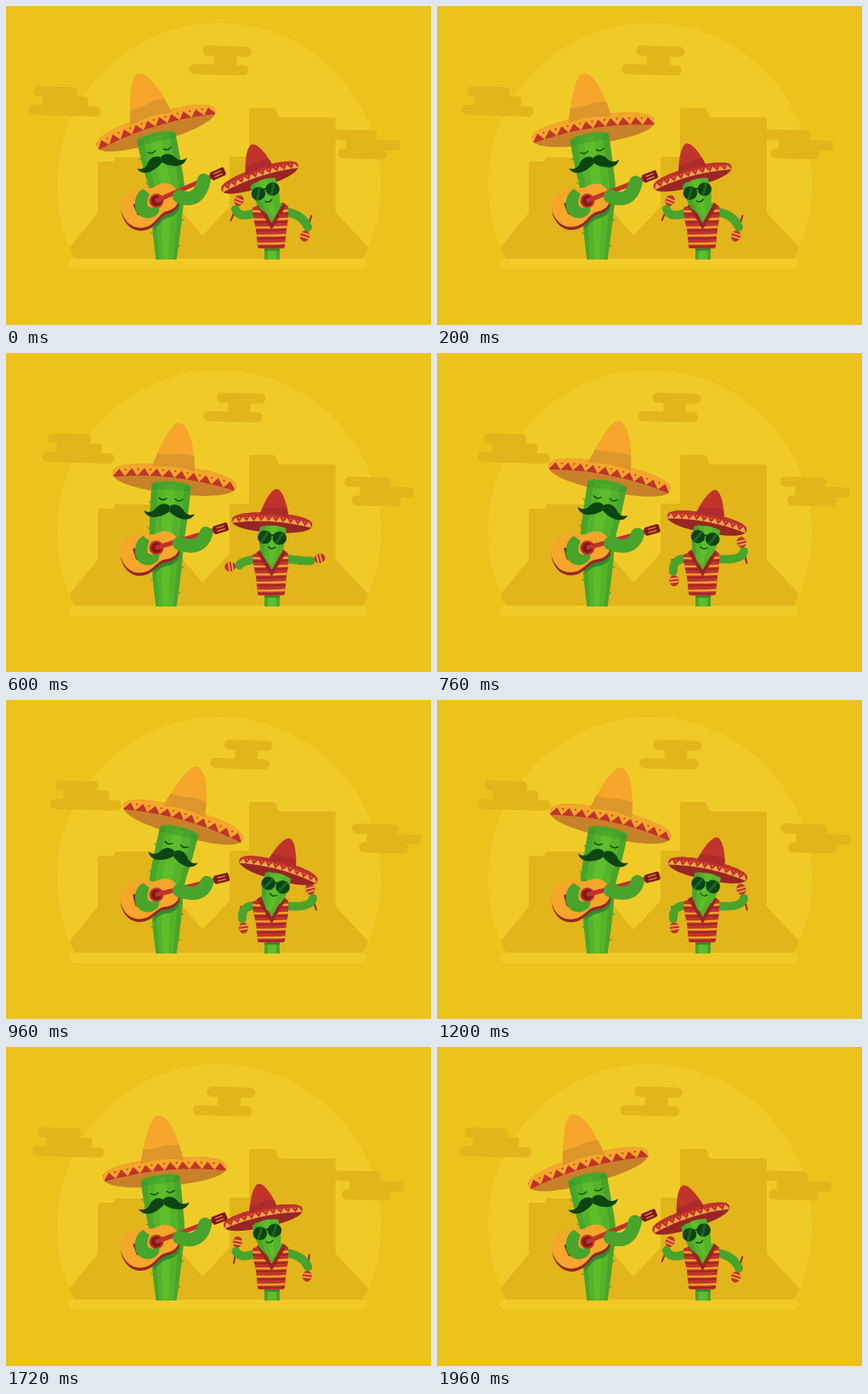
Write an HTML page with a canvas that moves like this. It is 500x375 px and loops after 2 s.

```html
<!DOCTYPE html>
<html lang="en">
<head>
<meta charset="utf-8">
<title>Cactus duo</title>
<style>
html, body { margin: 0; width: 100%; height: 100%; overflow: hidden; background: #edc31b; }
canvas { display: block; width: 500px; height: 375px; }
</style>
</head>
<body>
<canvas id="stage" width="500" height="375"></canvas>
<script>
const ctx = document.getElementById('stage').getContext('2d');
const LOOP = 2000, STEP = 40, RAD = Math.PI / 180;
const C = {
  sky: '#edc31b', sun: '#f0cb28', sand: '#e2b51a',
  green: '#54b329', light: '#5dbd2a', dark: '#48a42b', shade: '#2f8a2b', ink: '#0c4512',
  orange: '#f5a62b', amber: '#dd962a', brown: '#c78128',
  red: '#c1332b', brick: '#ad2b2a', wine: '#982524', deep: '#7d1a1c', peach: '#f2a545'
};

// ---------- helpers ----------
const mix = (a, b, k) => a + (b - a) * k;
const smooth = (a, b, v) => {
  const u = Math.min(1, Math.max(0, (v - a) / (b - a)));
  return u * u * (3 - 2 * u);
};
const wave = t => (1 - Math.cos(2 * Math.PI * t / LOOP)) / 2;

function poly(points, color) {
  ctx.beginPath();
  points.forEach(([x, y]) => ctx.lineTo(x, y));
  ctx.closePath();
  ctx.fillStyle = color;
  ctx.fill();
}
function oval(x, y, rx, ry, color) {
  ctx.beginPath();
  ctx.ellipse(x, y, rx, ry, 0, 0, Math.PI * 2);
  ctx.fillStyle = color;
  ctx.fill();
}
function box(x, y, w, h, r, color) {
  ctx.beginPath();
  ctx.roundRect(x, y, w, h, r);
  ctx.fillStyle = color;
  ctx.fill();
}
function shape(d, color) {
  ctx.fillStyle = color;
  ctx.fill(new Path2D(d));
}
function line(d, color, width) {
  ctx.strokeStyle = color;
  ctx.lineWidth = width;
  ctx.lineCap = ctx.lineJoin = 'round';
  ctx.stroke(new Path2D(d));
}
function at(x, y, deg, draw) {
  ctx.save();
  ctx.translate(x, y);
  ctx.rotate(deg * RAD);
  draw();
  ctx.restore();
}
function inside(path, draw) {
  ctx.save();
  ctx.clip(path);
  draw();
  ctx.restore();
}

// ---------- scenery ----------
function cloud(x, y, top, middle, bottom) {
  at(x, y, 1.4, () => [top, middle, bottom].forEach(([l, w], i) => box(l, i * 11, w, 12, i === 1 ? 4 : 6, C.sand)));
}
function scenery(p) {
  ctx.fillStyle = C.sky;
  ctx.fillRect(0, 0, 500, 375);
  const sun = new Path2D();
  sun.ellipse(250.5, 210, 190.5, 190, 0, 0, Math.PI * 2);
  const sky = new Path2D();
  sky.rect(0, 0, 500, 298);
  inside(sky, () => inside(sun, () => {
    ctx.fillStyle = C.sun;
    ctx.fillRect(0, 0, 500, 375);
    shape('M63 298L108 243V186Q108 183 111 183H125Q128 183 128 178H201Q204 178 204 181V238L231 270L263 236V180Q263 177 266 177H286V123Q286 120 289 120H314Q318 120 319 127Q320 131 324 131H385Q388 131 388 134V243L440 298Z', C.sand);
  }));
  box(74, 297, 351, 12, 6, C.sun);
  const s = 25 * p;
  cloud(27 + s, 94, [6, 51], [16, 54], [0, 85]);
  cloud(216 + s, 46, [16, 57], [29, 27], [0, 70]);
  cloud(382 + s, 145, [0, 55], [18, 64], [9, 58]);
}

// ---------- hats ----------
function brim(rx, ry, teeth, paint) {
  const outline = new Path2D(), base = x => rx * (-0.03 + 0.1 * (x / rx) ** 2);
  for (let i = 0; i < 72; i++) {
    const a = i * 5 * RAD, c = Math.cos(a), s = Math.sin(a);
    outline.lineTo(rx * Math.sign(c) * Math.abs(c) ** 0.88, ry * Math.sign(s) * Math.abs(s) ** 0.88);
  }
  inside(outline, () => {
    ctx.fillStyle = paint.under;
    ctx.fillRect(-rx, -ry, rx * 2, ry * 2);
    shape(`M${-rx} ${base(rx)}Q0 ${2 * base(0) - base(rx)} ${rx} ${base(rx)}V${-ry}H${-rx}Z`, paint.band);
    const w = rx * 2 / teeth, tall = rx * 0.125;
    for (let i = 0; i < teeth; i++) {
      const x = -rx + i * w, mid = x + w / 2;
      poly([[x, base(x)], [mid, base(mid) - tall], [x + w, base(x + w)]], paint.teeth);
      oval(x, base(x) - tall * 0.85, rx / 70, rx / 70, paint.teeth);
    }
  });
}
function cone(d, shadow, color, tint) {
  const path = new Path2D(d);
  ctx.fillStyle = color;
  ctx.fill(path);
  inside(path, () => shape(shadow, tint));
}
function bigHat() {
  brim(73, 16.5, 10, { under: C.brown, band: C.orange, teeth: C.red });
  cone('M-28 -12C-22 -34 -16 -52 -10 -61Q-4 -71 4 -65C13 -58 20 -36 23 -12Q0 -18 -28 -12Z',
    'M-30 -30Q-14 -27 -2 -30T30 -28V-8H-30Z', C.orange, C.amber);
}
function smallHat() {
  brim(47.5, 11.5, 11, { under: C.wine, band: C.red, teeth: C.peach });
  cone('M-15 -8C-11 -23 -6 -33 -2 -37Q3 -43 8 -37C13 -31 17 -20 19 -8Q3 -12 -15 -8Z',
    'M-20 -18Q-6 -16 2 -18T24 -17V-6H-20Z', C.red, C.brick);
}

// ---------- guitarist ----------
const TOP = 155, FOOT = 298;
function trunk(y, f) {
  const u = Math.max(0, (y - TOP) / (FOOT - TOP));
  return 190 - 1.5 * u + (2 * f - 1) * (23 - 11 * u ** 1.8);
}
const GUITAR = new Path2D('M-43 1C-44 -15 -31 -24 -17 -22C-7 -21 -3 -15 5 -16C16 -18 26 -13 27 0C27 13 17 18 6 16C-2 15 -7 21 -17 23C-31 25 -42 16 -43 1Z');
function guitarShape(x, y, tilt, color) {
  at(x, y, tilt, () => {
    ctx.fillStyle = color;
    ctx.fill(GUITAR);
  });
}
function guitarist(p, ramp) {
  const m = (ramp + Math.sin(ramp * Math.PI / 2)) / 2;
  const hump = 4 * p * (1 - p), lean = mix(-12.5, 13, p);
  const px = 190, py = 214 + 3.4 * hump;

  at(176.5 + 33 * (ramp + m) / 2, 143.5 + 6 * hump, mix(-17, 16.5, m), bigHat);

  // The trunk is straight at the foot and turns with the head above it.
  const bend = (x, y) => {
    const k = smooth(246, 190, y), a = lean * k * RAD, dx = x - px, dy = y - 217;
    return [px + dx * Math.cos(a) - dy * Math.sin(a), 217 + (py - 217) * k + dx * Math.sin(a) + dy * Math.cos(a)];
  };
  const strip = (f, g, color, end = FOOT) => {
    const left = [], right = [];
    for (let i = 0; i <= 36; i++) {
      const y = mix(TOP, end, i / 36);
      left.push(bend(trunk(y, f), y));
      right.unshift(bend(trunk(y, g), y));
    }
    poly(left.concat(right), color);
  };
  at(px, py, lean, () => oval(0, -62, 23, 4.5, C.dark));
  strip(0, 1, C.green);
  strip(0, 0.16, C.dark);
  strip(0.34, 0.62, C.light);
  strip(0.84, 1, C.dark);
  strip(0, 1, 'rgba(47,138,43,.35)', 161);

  for (let i = 0; i < 8; i++) {
    const side = i % 2, y = 178 + i * 15, d = side ? 2.2 : -2.2;
    line(`M${bend(trunk(y, side), y)}L${bend(trunk(y, side) + d, y - 1.8)}`, C.dark, 1.1);
  }

  at(px, py, lean, () => {
    for (const x of [-9, 10]) line(`M${x - 4.5} -46Q${x} -42 ${x + 4.5} -46`, C.ink, 1.3);
    const half = 'M0 -6C-4 -10 -12 -9 -16 -3C-19 2 -24 4 -30 1C-27 8 -20 9 -14 7.5C-8 6 -3 3 0 0Z';
    at(0, -31, 0, () => {
      shape(half, C.ink);
      ctx.scale(-1, 1);
      shape(half, C.ink);
    });
  });

  const tilt = mix(-23.7, -13.9, m);
  const lower = new Path2D();
  for (const y of [195, 220, 250, 280]) lower.rect(trunk(y + 25, 0), y, trunk(y + 25, 1) - trunk(y + 25, 0), 30);
  inside(lower, () => guitarShape(178, 237, tilt, C.shade));
  guitarShape(177.5, 232.5, tilt, C.wine);
  guitarShape(177, 229, tilt, C.orange);
  at(177, 229, tilt, () => {
    oval(0, 0, 8.5, 8.5, C.red);
    oval(0, 0, 6.2, 6.2, C.deep);
    box(-27, -7, 3.5, 14, 1, C.deep);
    box(-1, -2.8, 72, 5.4, 0, C.red);
    box(70, -5, 18, 10, 2, C.deep);
    for (const y of [-2.6, 1.2]) box(74, y, 10, 1.5, 0.7, '#e07a3c');
  });

  shape('M161 215C152 220 150 232 153 241C157 249 168 252 175 247Q182 243 180 236Q172 239 167 235Q165 228 169 221Z', C.dark);
  const a = tilt * RAD, hx = 177 + 62 * Math.cos(a), hy = 229 + 62 * Math.sin(a);
  line(`M204 224Q${hx - 7} 233 ${hx - 1} ${hy + 1}`, C.dark, 16);
}

// ---------- maraca player ----------
const LEFT = {
  shoulder: [296, 242],
  rest: { hand: [270, 239], elbow: [274, 251], turn: -68 },
  swung: { hand: [278, 257], elbow: [277, 240], turn: -277 }
};
const RIGHT = {
  shoulder: [329, 242],
  rest: { hand: [355, 260], elbow: [349, 245], turn: 108 },
  swung: { hand: [361, 233], elbow: [359, 245], turn: -106 }
};
function maraca() {
  line('M-14 0H6', C.wine, 2);
  const head = new Path2D();
  head.ellipse(11, 0, 6.5, 5.6, 0, 0, Math.PI * 2);
  inside(head, () => {
    box(0, -8, 20, 16, 0, C.red);
    for (const x of [7.5, 11.5]) box(x, -8, 1.8, 16, 0, C.peach);
  });
}
function arm({ shoulder, rest, swung }, k) {
  const hand = rest.hand.map((v, i) => mix(v, swung.hand[i], k));
  const elbow = rest.elbow.map((v, i) => mix(v, swung.elbow[i], k));
  at(...hand, mix(rest.turn, swung.turn, k), maraca);
  line(`M${shoulder}Q${elbow} ${hand}`, C.dark, 10);
}
function player(p, swing) {
  box(304, 280, 18, 18, 0, C.dark);
  box(308, 280, 10, 18, 0, C.light);
  box(304, 285, 18, 2.5, 0, C.shade);
  arm(LEFT, swing);
  arm(RIGHT, swing);

  const poncho = new Path2D('M290 237L300 233H325L332 235Q333 248 330 262L328 282Q328 285 325 285H299Q296 285 296 282L294 262Q290 248 290 237Z');
  inside(poncho, () => {
    box(285, 230, 55, 60, 0, C.red);
    for (let y = 241; y < 285; y += 9.5) {
      line(`M285 ${y}Q312 ${y + 1} 340 ${y - 1}`, C.orange, 2.4);
      line(`M285 ${y + 3.6}Q312 ${y + 4.6} 340 ${y + 2.6}`, C.wine, 1.4);
    }
  });
  poly([[295, 234], [300, 231], [326, 231], [330, 234], [312.5, 263]], C.wine);
  poly([[300, 231], [326, 231], [312.5, 255]], C.green);

  at(311.5, 238, mix(-18, 15, p), () => {
    at(-1, -38.5, 0, smallHat);
    shape('M-15 -32Q0 -38 16 -33Q17 -14 12 -3L2 10Q-1 12 -4 8L-12 -4Q-16 -16 -15 -32Z', C.green);
    shape('M-15 -32Q-12 -34 -9 -35Q-10 -15 -6 5L-12 -4Q-16 -16 -15 -32Z', C.dark);
    shape('M-3 -35H6Q7 -16 3 8L-1 10Q-4 -12 -3 -35Z', C.light);
    line('M-8 -24H9', C.ink, 1.8);
    for (const x of [-8.5, 9]) {
      const lens = new Path2D();
      lens.ellipse(x, -21, 8.3, 7.8, 0, 0, Math.PI * 2);
      ctx.fillStyle = C.ink;
      ctx.fill(lens);
      inside(lens, () => line(`M${x + 5} -30L${x - 5} -12`, '#1f6426', 3));
    }
    line('M-3.5 -10Q0.5 -6 4.5 -10', C.ink, 1.3);
  });
}

function draw(now) {
  const t = Math.floor(now % LOOP / STEP) * STEP;
  const p = wave(t), ramp = 1 - Math.abs(1 - 2 * t / LOOP);
  scenery(p);
  player(p, smooth(0.2, 0.8, wave(t - 80)));
  guitarist(p, ramp);
}
let start;
function tick(now) {
  start ??= now;
  draw(now - start);
  requestAnimationFrame(tick);
}
draw(0);
requestAnimationFrame(tick);
</script>
</body>
</html>
```
